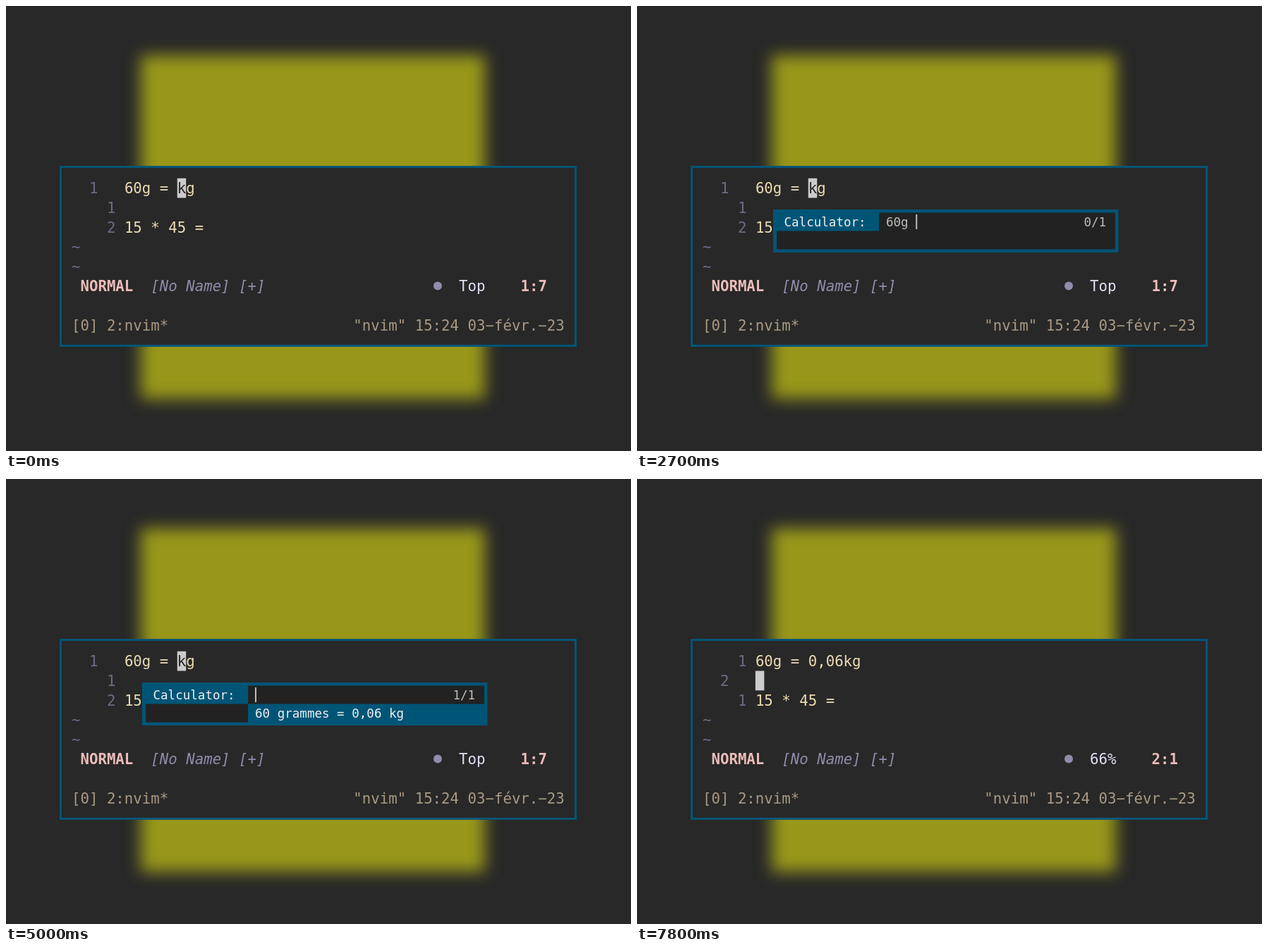
Recreate the animation shown at these times as an HTML page. Size 886 by 632 pixels, loop 8 s.

```html
<!DOCTYPE html>
<html lang="en">
<head>
<meta charset="utf-8">
<title>Calculator popup in a terminal editor</title>
<style>
  html, body { margin: 0; width: 100%; height: 100%; overflow: hidden; background: #282828; }
  svg { display: block; width: 886px; height: 632px; }
  text { font-family: "DejaVu Sans Mono", "Noto Sans Mono", monospace; font-size: 20.73px; white-space: pre; }
  .backdrop { fill: #98971a; filter: blur(11px); }
  .window { fill: #282828; stroke: #057; stroke-width: 3; }
  .code { fill: #ebdbb2; }
  .num { fill: #6e6a86; }
  .mode { fill: #ebbcba; font-weight: bold; }
  .insert .mode { fill: #9ccfd8; }
  .soft { fill: #908caa; }
  .file { font-style: italic; }
  .pos { fill: #e0def4; }
  .bar { fill: #a89984; }
  .block { fill: #ccc; }
  .under { fill: #282828; }
  #popup text { font-size: 17.54px; fill: #bbb; }
  #popup .bright { fill: #eee; }
  .accent { fill: #057; }
  .panel { fill: #222; }
</style>
</head>
<body>
<svg viewBox="0 0 886 632">
  <rect width="886" height="632" fill="#282828"/>
  <rect class="backdrop" x="191" y="70" width="488" height="488"/>
  <rect class="window" x="77.5" y="228.5" width="730" height="254"/>
  <g id="screen"></g>
  <g id="popup">
    <rect class="accent" x="193" y="289" width="489.5" height="61"/>
    <rect class="panel" x="198" y="293.5" width="480" height="52"/>
    <rect class="accent" x="193" y="293" width="150" height="26.5"/>
    <text class="bright" x="208.5" y="312.5">Calculator:</text>
    <text id="query" x="353" y="312.5"></text>
    <rect id="caret" y="296" width="2" height="21" fill="#bbb"/>
    <text id="count" x="633.4" y="312.5"></text>
    <g id="result">
      <rect class="accent" x="343" y="319.5" width="336" height="27"/>
      <text id="item" class="bright" x="353" y="338.5"></text>
    </g>
  </g>
</svg>
<script>
  const LOOP = 8000, LEFT = 93, CELL = 12.48, TOP = 244.7, ROW = 27.8, POPUP_CELL = 10.56;
  const $ = id => document.getElementById(id);
  const screen = $("screen");

  function add(tag, attrs, content = "") {
    const el = document.createElementNS("http://www.w3.org/2000/svg", tag);
    for (const k in attrs) el.setAttribute(k, attrs[k]);
    el.textContent = content;
    screen.appendChild(el);
    return el;
  }

  // Text on the terminal's character grid.
  const put = (row, col, cls, str = "") =>
    add("text", { class: cls, x: LEFT + col * CELL, y: 266 + row * ROW }, str);

  const numbers = [0, 1, 2].map(row => put(row, 0, "num"));
  const firstLine = put(0, 6, "code");
  put(2, 6, "code", "15 * 45 =");
  put(3, 0, "num", "~");
  put(4, 0, "num", "~");
  const block = add("rect", { class: "block", width: CELL, height: ROW });
  const under = put(0, 0, "under");
  const mode = put(5, 1, "mode");
  put(5, 9, "soft file", "[No Name] [+]");
  add("circle", { class: "soft", cx: 612, cy: 397.5, r: 6 });
  const place = put(5, 44, "pos");
  const position = put(5, 51, "mode");
  const notice = put(6, 0, "soft");
  put(7, 0, "bar", "[0] 2:nvim*");
  put(7, 32, "bar", "\"nvim\" 15:24 03−févr.−23");

  // Each step changes some of the state from its start time on.
  const steps = [
    [0, { popup: false, query: "", item: "", value: "", insert: false, line: 1, col: 7 }],
    [700, { popup: true, item: "No history found" }],
    [1500, { query: "60", item: "" }],
    [1600, { query: "60g" }],
    [2700, { query: "60g " }],
    [3000, { query: "60g t" }],
    [3300, { query: "60g to" }],
    [3500, { query: "60g to " }],
    [3900, { query: "60g to k" }],
    [4200, { query: "60g to kg" }],
    [4500, { popup: false }],
    [4600, { popup: true, query: "", item: "60 grammes = 0,06 kg" }],
    [5400, { popup: false }],
    [6200, { insert: true }],
    [6500, { value: "0,0", col: 10 }],
    [6600, { value: "0,06", col: 11 }],
    [7700, { insert: false, col: 10 }],
    [7800, { line: 2, col: 1 }]
  ];

  function draw(s) {
    const text = "60g = " + s.value + "kg";
    firstLine.textContent = text;
    numbers.forEach((el, i) => {
      const away = Math.abs(i + 1 - s.line);
      el.textContent = away ? "    " + away : "  " + s.line;
    });

    const x = LEFT + (5 + s.col) * CELL;
    block.setAttribute("x", x);
    block.setAttribute("y", TOP + (s.line - 1) * ROW);
    under.setAttribute("x", x);
    under.textContent = s.line === 1 ? text[s.col - 1] : "";

    screen.setAttribute("class", s.insert ? "insert" : "");
    mode.textContent = s.insert ? "INSERT" : "NORMAL";
    notice.textContent = s.insert ? "−− INSERTION −−" : "";
    place.textContent = s.line === 1 ? "Top" : "66%";
    position.textContent = s.line + ":" + s.col;

    $("popup").style.display = s.popup ? "" : "none";
    $("result").style.display = s.item ? "" : "none";
    $("query").textContent = s.query;
    $("item").textContent = s.item;
    $("count").textContent = s.item ? "1/1" : "0/1";
    $("caret").setAttribute("x", 353 + s.query.length * POPUP_CELL);
  }

  const start = performance.now();
  let shown = 0;
  function tick() {
    const t = Math.max(0, performance.now() - start) % LOOP;
    const past = steps.filter(step => step[0] <= t);
    if (past.length !== shown) {
      shown = past.length;
      draw(Object.assign({}, ...past.map(step => step[1])));
    }
    requestAnimationFrame(tick);
  }
  tick();
</script>
</body>
</html>
```
